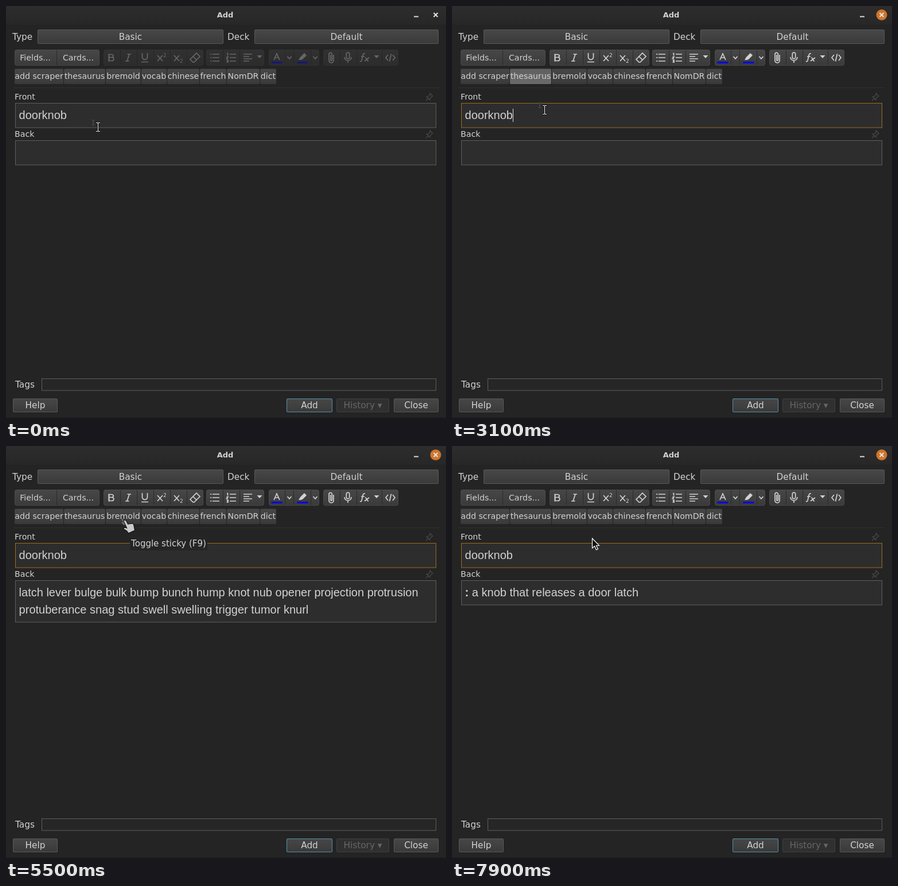
An HTML page for the animation above (8000 ms loop, 767 by 718 pixels).

```html
<!DOCTYPE html>
<html lang="en">
<head>
<meta charset="utf-8">
<title>Add</title>
<style>
  html, body { margin: 0; width: 100%; height: 100%; overflow: hidden; background: #242425; }
  svg { display: block; }
  text { font: 14.2px "DejaVu Sans", sans-serif; fill: #d2d2d2; white-space: pre; }
  .qt { font-size: 15.3px; }
  .title { font-size: 13px; font-weight: bold; }
  .field { font: 20px "Liberation Sans", Arial, sans-serif; }
  .mid { text-anchor: middle; }
  .icon { fill: none; stroke: #d2d2d2; stroke-width: 1.7; }
  .solid { fill: #d2d2d2; stroke: none; }
  .box { fill: #2d2d2d; stroke: #5e5e5e; }
</style>
</head>
<body>
<svg id="stage" width="767" height="718" viewBox="0 0 767 718">
  <defs>
    <linearGradient id="btn" x2="0" y2="1"><stop stop-color="#474747"/><stop offset="1" stop-color="#3a3a3a"/></linearGradient>
    <linearGradient id="hot" x2="0" y2="1"><stop stop-color="#606060"/><stop offset="1" stop-color="#6a6a6a"/></linearGradient>
    <linearGradient id="bar" x2="0" y2="1"><stop stop-color="#2d2d2d"/><stop offset="1" stop-color="#272727"/></linearGradient>
    <radialGradient id="press" r=".72"><stop offset=".4" stop-color="#6a6a6a"/><stop offset="1" stop-color="#383838"/></radialGradient>
    <g id="pin" fill="none" stroke="#4a4a4a" stroke-width="1.1">
      <path d="M1-6L6-1L4 0L1 3V6L-5 0H-2L1-3ZM-2 3L-6 7"/>
    </g>
    <path id="shape-i" d="M-4-8.5H-1L0-7.5L1-8.5H4V-6.5H1V6.5H4V8.5H1L0 7.5L-1 8.5H-4V6.5H-1V-6.5H-4Z"/>
    <path id="shape-h" d="M-8-11C-6-12-5-10-4-8L-2-4L5-5Q8-5 8.5-1L10 7L-1 12L-4 8L-9 5Q-10 2-7 2L-4 3L-9-8Q-10-10-8-11Z"/>
    <path id="shape-a" d="M0 0V17L4 13.5L7 20L10 18.5L7 12.5H12Z"/>
  </defs>
</svg>
<script>
const stage = document.getElementById('stage');
const rect = (x, y, r, b, attrs) => `<rect x="${x}" y="${y}" width="${r - x}" height="${b - y}" ${attrs}/>`;
const text = (x, y, s, cls = '', more = '') => `<text x="${x}" y="${y}" class="${cls}" ${more}>${s}</text>`;
const line = (x, y, r, color) => `<path d="M${x} ${y}H${r}" stroke="${color}"/>`;
const icon = (x, body) => `<g class="icon" transform="translate(${x} 90)">${body}</g>`;
const path = (d, cls = '') => `<path d="${d}" class="${cls}"/>`;

function button(x, y, r, b, label, border = '#595959', color = '#d2d2d2', fill = 'url(#btn)') {
  return rect(x + .5, y + .5, r - .5, b - .5, `rx="1.5" fill="${fill}" stroke="${border}"`) +
    text((x + r) / 2, (y + b) / 2 + 5.3, label, 'qt mid', `style="fill:${color}"`);
}

// A rounded toolbar group; cuts are the inner dividers.
function group(x, r, cuts) {
  return rect(x, 76, r, 104, 'rx="4" fill="url(#btn)"') +
    rect(x + .5, 76.5, r - .5, 103.5, 'rx="4" fill="none" stroke="#4f4f4f" stroke-opacity=".7"') +
    cuts.map(c => `<path d="M${c + .5} 77V103" stroke="#2b2b2b"/>`).join('');
}

const chevron = path('M-3.5-2L0 2L3.5-2');
const triangle = path('M-4.5-4H4.5L0 1Z', 'solid');
const cross = 'M-7-4L2 6M2-4L-7 6';
const lines = (x, ys, r) => ys.map(y => `M${x} ${y}H${r}`).join('');
const blue = '<path d="M-9.5 8.5H9.5" stroke="#00f" stroke-width="3"/>';

const tools = group(170, 344, [199, 228, 257, 286, 315]) + group(349, 450, [378, 407]) +
  group(458, 546, [486, 501, 531]) + group(553, 684, [582, 611, 655]) +
  icon(183, path('M-3.5-5.5H1C5.5-5.5 5-.5 1-.5H-3.5H1.5C6 -.5 6 5.5 1.5 5.5H-3.5Z') + path('M-3.5-6.5V6.5')) +
  icon(213, path('M-1.5-6H5M-5 6H1.5M2-6L-2 6')) +
  icon(242, path('M-4.5-8V-1a4.5 4.5 0 0 0 9 0V-8M-6 7.5H6')) +
  icon(271, path(cross) + text(3, -1, '2', '', 'stroke="none" style="font-size:9px"')) +
  icon(300, path(cross) + text(3, 9, '2', '', 'stroke="none" style="font-size:9px"')) +
  icon(329, path('M-8 3L3-8L9-2L-1 8H-3ZM-3-2L3 4')) +
  icon(364, path(lines(-4, [-6, 0, 6], 8)) + path(lines(-8, [-6, 0, 6], -5.5))) +
  icon(393, path(lines(-3, [-6, 0, 6], 8)) +
    path('M-8-7.5H-6.5V-3.5M-8.5-1.5H-6L-8.5 1.5H-6M-8.5 4H-6V8H-8.5M-8 6H-6') ) +
  icon(421, path(lines(-7, [-6, 2], 8) + lines(-7, [-2, 6], 3))) + icon(442, triangle) +
  icon(472, path('M-5 4L0-7L5 4M-3.5 0H3.5') + blue) + icon(494, chevron) +
  icon(517, path('M-7 4L-4-1L3-8L7-4L0 3L-3 4Z', 'solid') + blue) + icon(539, chevron) +
  icon(567, path('M4-5V5a4 4 0 0 1-8 0V-6a2.7 2.7 0 0 1 5.4 0V4a1.3 1.3 0 0 1-2.6 0V-5', '')) +
  icon(596, '<rect x="-2.7" y="-9" width="5.4" height="11" rx="2.7"/>' + path('M-6-1a6 6 0 0 0 12 0M0 5V9')) +
  icon(625, path('M1-7Q-2-8-3-4L-5 5Q-6 8-8 6M-6-2H0M1 0Q3 0 4 3T7 6M8 0L0 6')) + icon(646, triangle) +
  icon(670, path('M-4-5L-8 0L-4 5M4-5L8 0L4 5M1.5-6.5L-1.5 6.5'));

const scrapers = [['add scraper', 15, 100], ['thesaurus', 101, 173], ['bremold', 174, 235], ['vocab', 236, 280],
  ['chinese', 281, 337], ['french', 338, 384], ['NomDR', 385, 442], ['dict', 443, 471]];

stage.insertAdjacentHTML('beforeend',
  rect(0, 0, 767, 33, 'fill="url(#bar)"') + line(0, 33.5, 767, '#222') +
  text(382, 20, 'Add', 'title mid') +
  '<path d="M711 18.5H719" stroke="#d8d8d8" stroke-width="2"/>' +
  '<circle id="orange" cx="749" cy="15.5" r="9.5" fill="#cf752b"/>' +
  '<path d="M745.5 12L752.5 19M752.5 12L745.5 19" stroke="#e4e4e4" stroke-width="2"/>' +
  text(11, 59, 'Type', 'qt') + text(386, 59, 'Deck', 'qt') +
  button(55, 41, 379, 66, 'Basic') + button(433, 41, 754, 66, 'Default') +
  group(15, 163, [88]) + text(51, 94.5, 'Fields...', 'mid') + text(126, 94.5, 'Cards...', 'mid') +
  `<g id="tools">${tools}</g>` +
  scrapers.map(([s, x, r], i) => rect(x, 109.5, r, 136, 'rx="2" fill="url(#btn)"') +
    rect(x, 109.5, r, 136, `id="hot${i}" rx="2" fill="url(#hot)" opacity="0"`) +
    text((x + r) / 2, 127, s, 'mid')).join('') +
  line(12, 142.5, 755, '#2f2f2f') +
  text(15, 162.5, 'Front') + text(15, 227.5, 'Back') +
  '<use href="#pin" x="738" y="158"/><use href="#pin" x="738" y="223"/>' +
  rect(16.5, 169.5, 749.5, 212, 'id="front" class="box"') + text(22.6, 197, 'doorknob', 'field') +
  '<path id="caret" stroke="#e0e0e0"/>' +
  rect(16.5, 234.5, 749.5, 277, 'id="back" class="box"') +
  '<g id="synonyms">' +
  text(22.6, 262, 'latch lever bulge bulk bump bunch hump knot nub opener projection protrusion', 'field') +
  text(22.6, 292, 'protuberance snag stud swell swelling trigger tumor knurl', 'field') + '</g>' +
  '<g id="meaning">' +
  text(22.6, 262, '<tspan font-weight="bold">:</tspan> a knob that releases a door latch', 'field') + '</g>' +
  text(16, 665, 'Tags', 'qt') + rect(62.5, 649.5, 749.5, 670, 'class="box" style="fill:#262626"') +
  button(12, 684, 90, 708, 'Help') + button(489, 684, 569, 708, 'Add', '#5690a6') +
  button(576, 684, 668, 708, 'History ▾', '#3f3f3f', '#666', '#303030') + button(676, 684, 754, 708, 'Close') +
  line(0, 717.5, 767, '#1c1c1c') +
  '<g id="tip">' + rect(216, 156, 351, 182, 'fill="#252526"') +
  text(283.5, 174.5, 'Toggle sticky (F9)', 'mid', 'style="font-size:15px"') + '</g>' +
  '<g id="cursor"></g>');

const el = id => document.getElementById(id);
const show = (id, on) => { el(id).style.display = on ? '' : 'none'; };
const between = (t, a, b) => t >= a && t < b;

// Pointer path: time, x, y, shape (i = beam, a = arrow, h = hand).
const route = [[0, 152, 203, 'i'], [600, 152, 203, 'i'], [1000, 144, 160, 'a'], [1200, 137, 135, 'h'],
  [1400, 133, 131, 'h'], [2100, 133, 131, 'h'], [2400, 145, 172, 'h'], [3000, 145, 172, 'h'],
  [3100, 153, 173, 'i'], [3300, 160, 172, 'i'], [4300, 160, 172, 'i'], [4600, 186, 157, 'a'],
  [5000, 200, 149, 'a'], [5200, 200, 149, 'a'], [5400, 205, 136, 'h'], [5500, 206, 132, 'h'],
  [6200, 206, 132, 'h'], [6500, 212, 156, 'h'], [6600, 315, 161, 'h'], [6700, 315, 161, 'h'],
  [6900, 260, 174, 'i'], [7100, 237, 174, 'i'], [7500, 237, 174, 'i'], [7800, 236, 156, 'a'],
  [7900, 236, 153, 'a'], [8000, 236, 153, 'a']];

function pointer(t) {
  const n = route.findIndex(k => k[0] > t);
  const [a, b] = [route[n - 1], route[n]];
  const u = (t - a[0]) / (b[0] - a[0]);
  return [a[1] + (b[1] - a[1]) * u, a[2] + (b[2] - a[2]) * u, a[3]];
}

function drawCursor(t) {
  const [x, y, shape] = pointer(t);
  const paint = shape === 'i' ? 'fill="#fff" stroke="#111" stroke-width="1"'
    : shape === 'h' ? 'fill="#c9c9c9" stroke="#111" stroke-width="1.2"'
    : 'fill="#111" stroke="#fff" stroke-width="1.2"';
  const ghost = shape === 'a' ? '' :
    `<use href="#shape-${shape}" transform="translate(${x} ${y}) scale(.52)" fill="#777" stroke="#333"/>`;
  el('cursor').innerHTML = ghost +
    `<use href="#shape-${shape}" transform="translate(${x + 8.5} ${y + 8})" ${paint}/>`;
}

function draw(t) {
  const focused = t >= 2200;
  const filled = between(t, 3200, 7000);
  show('orange', focused);
  el('tools').setAttribute('opacity', focused ? 1 : .38);
  el('front').style.stroke = focused ? '#9a6c1e' : '';
  el('back').setAttribute('height', filled ? 72.5 : 42.5);
  show('synonyms', filled);
  show('meaning', t >= 7000);
  show('tip', between(t, 4800, 5700));
  el('hot1').setAttribute('opacity', between(t, 1200, 3200) ? (t < 1300 ? .5 : 1) : 0);
  el('hot2').setAttribute('opacity', between(t, 5600, 6900) ? 1 : 0);
  el('hot2').setAttribute('fill', t >= 6400 ? 'url(#press)' : 'url(#hot)');
  const atEnd = between(t, 2300, 3200);
  const atStart = [[3500, 4100], [4700, 5300], [5900, 7600]].some(([a, b]) => between(t, a, b));
  show('caret', atEnd || atStart);
  el('caret').setAttribute('d', `M${atEnd ? 106.5 : 23.5} 179V202`);
  drawCursor(t);
}

function tick() {
  draw(Math.floor(performance.now() % 8000 / 100) * 100);
  requestAnimationFrame(tick);
}
tick();
</script>
</body>
</html>
```
